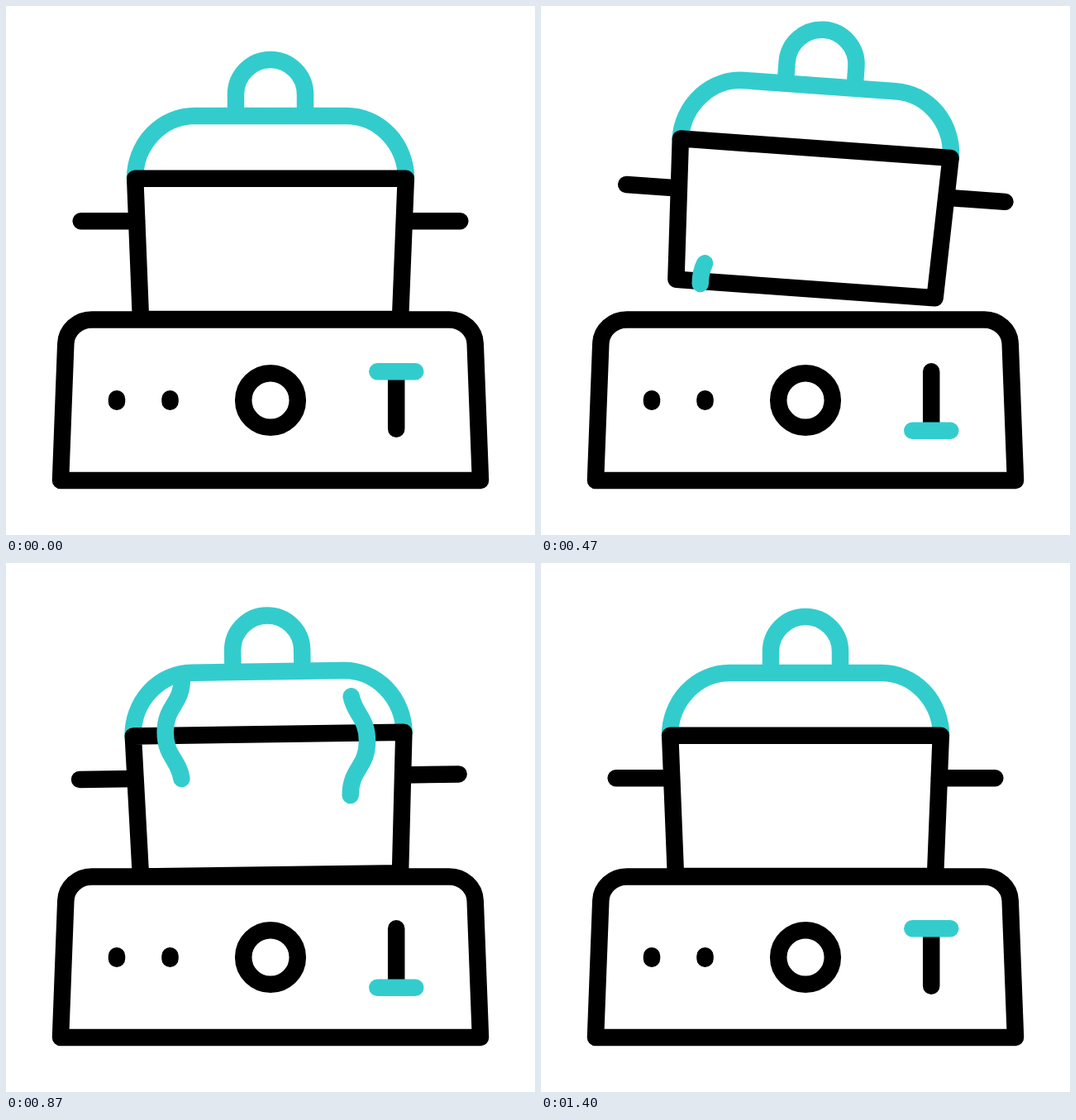
These frames come from a looping animation (640 by 640 pixels, 1670 ms). An HTML page:

```html
<!DOCTYPE html>
<html lang="en">
<head>
<meta charset="utf-8">
<title>Cooking pot</title>
<style>
  html, body { margin: 0; width: 100%; height: 100%; overflow: hidden; background: #fff; }
  svg { display: block; width: 100%; height: 100%; }
  path, line, circle { fill: none; stroke: #000; stroke-width: 20.5; stroke-linecap: round; stroke-linejoin: round; }
  .solid { fill: #fff; }
  .teal { stroke: #33cccd; }
</style>
</head>
<body>
<svg viewBox="0 0 640 640">
  <g id="pot">
    <path class="teal" d="M156 209A72 76 0 0 1 228 133H412A72 76 0 0 1 484 209"/>
    <path class="teal" style="stroke-linecap:butt" d="M278 133V107A42 42 0 0 1 362 107V133"/>
    <line id="back"/>
    <path class="solid" d="M156.2 208.7H483.8L477 379H163Z"/>
    <line id="front"/>
  </g>

  <path class="solid" d="M66 574L72.3 408.5A31.5 30 0 0 1 104 379.5H536A31.5 30 0 0 1 567.7 408.5L574 574Z"/>
  <path d="M134 475.2V478.8M198.5 475.2V478.8M472.2 442.2V511.8"/>
  <circle cx="320" cy="477" r="32.8"/>
  <path id="slider" class="teal" d="M449.3 442.2H495.2"/>

  <path id="steamL" class="teal" pathLength="1"/>
  <path id="steamR" class="teal" pathLength="1"/>
</svg>
<script>
const LOOP = 1670, FPS = 30;
const PIVOT = { x: 320, y: 379 };
const el = id => document.getElementById(id);

// cubic-bezier(.4, 0, .6, 1), solved by bisection
function ease(x) {
  if (x <= 0) return 0;
  if (x >= 1) return 1;
  let lo = 0, hi = 1, s = 0.5;
  for (let i = 0; i < 24; i++) {
    s = (lo + hi) / 2;
    const bx = 1.2 * s * (1 - s) ** 2 + 1.8 * s * s * (1 - s) + s ** 3;
    if (bx < x) lo = s; else hi = s;
  }
  return s * s * (3 - 2 * s);
}

const ramp = (n, from, to) => ease((n - from) / (to - from));

// keys: [frame, value] pairs, eased between neighbours
function track(keys, n) {
  let value = keys[0][1];
  for (let i = 1; i < keys.length; i++) {
    const [a, va] = keys[i - 1], [b, vb] = keys[i];
    if (n >= a) value = va + (vb - va) * ramp(n, a, b);
  }
  return value;
}

const TILT = [[0, 0], [8, -8.65], [15, 4.7], [22, -3.4], [28, 0]];
const LIFT = [[0, 0], [14, 37], [28, 0]];
const SLIDE = [[0, 0], [6, 71.6], [26, 71.6], [32, 0]];

const STEAM_TIME = 14.8;
const STEAM = [
  { path: el('steamL'), x: 192.7, y: 336, head: 10.5, tail: 19.7 },
  { path: el('steamR'), x: 416.7, y: 281, head: 17.6, tail: 27 }
];

function wave(x, y) {
  const half = 65.6, w = 20.3;
  let d = `M${x} ${y}`;
  for (let i = 0; i < 3; i++) {
    const dx = i % 2 ? -w : w;
    d += `c0 ${-half / 2} ${dx} ${-half / 2} ${dx} ${-half}`;
  }
  return d;
}
STEAM.forEach(s => s.path.setAttribute('d', wave(s.x, s.y)));

function setHandle(line, k, sway) {
  const dx = 4 * sway, y = 260.3 + sway * (2.5 - 6 * k);
  line.setAttribute('x1', PIVOT.x + 162 * k + dx);
  line.setAttribute('x2', PIVOT.x + 229.3 * k + dx);
  line.setAttribute('y1', y);
  line.setAttribute('y2', y);
}

function draw(n) {
  el('pot').setAttribute('transform',
    `translate(0 ${-track(LIFT, n)}) rotate(${track(TILT, n)} ${PIVOT.x} ${PIVOT.y})`);

  // two half turns: the near handle goes left to right, the far one back
  const turn = n <= 14 ? ramp(n, 4, 14) : ramp(n, 14, 24);
  const k = 2 * turn - 1;
  const sway = Math.max(0, 1 - Math.abs(n - 14) / 4);
  setHandle(el('front'), k, sway);
  setHandle(el('back'), -k, sway);

  el('slider').setAttribute('transform', `translate(0 ${track(SLIDE, n)})`);

  for (const s of STEAM) {
    const head = ramp(n, s.head, s.head + STEAM_TIME);
    const tail = ramp(n, s.tail, s.tail + STEAM_TIME);
    const on = head - tail > 0.0005;
    s.path.style.display = on ? '' : 'none';
    if (on) {
      s.path.setAttribute('stroke-dasharray', `${head - tail} 3`);
      s.path.setAttribute('stroke-dashoffset', -tail);
    }
  }
}

const start = performance.now();
function tick() {
  const t = (performance.now() - start) % LOOP;
  draw(Math.floor((t + 5) * FPS / 1000));
  requestAnimationFrame(tick);
}
tick();
</script>
</body>
</html>
```
